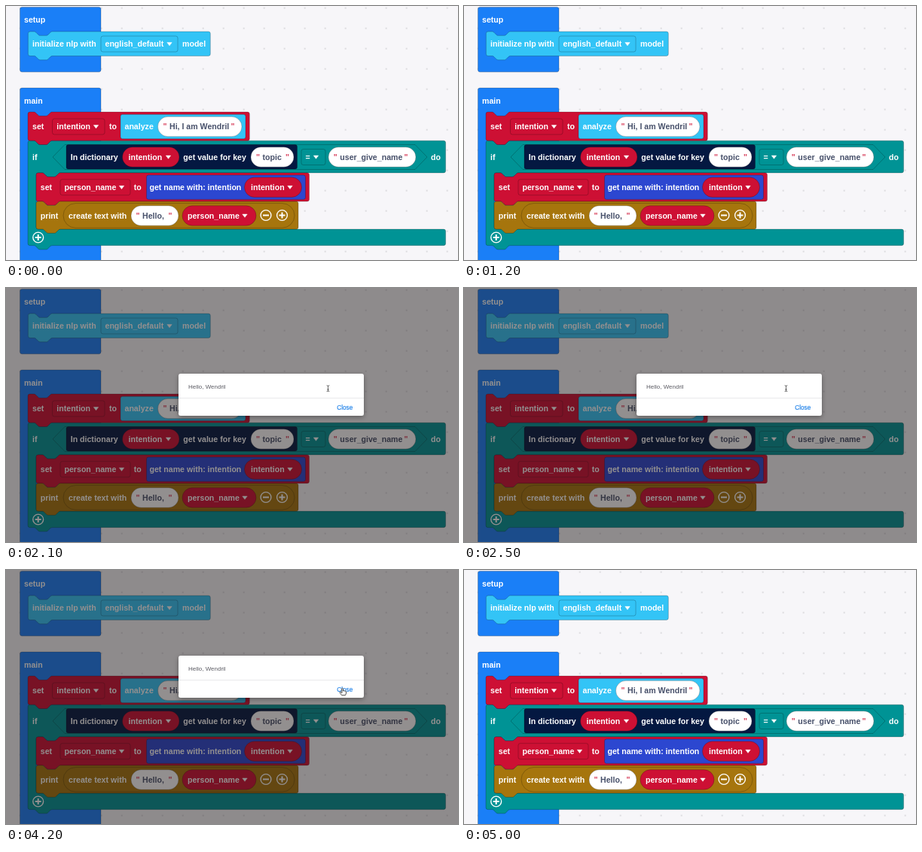
These frames come from a looping animation (600 px wide and 338 px high, 5100 ms). An HTML page:

```html
<!DOCTYPE html>
<html lang="en">
<head>
<meta charset="utf-8">
<title>Block program greeting</title>
<style>
html, body { margin: 0; width: 100%; height: 100%; overflow: hidden; background: #f7f6f9; }
svg { display: block; width: 600px; height: 338px; }
text { font: bold 10.6px "Liberation Sans", Arial, sans-serif; white-space: pre; }
.edge { stroke: #000; stroke-opacity: .28; stroke-width: .8; }
#dialog text { font-size: 8px; font-weight: normal; }
</style>
</head>
<body>
<svg viewBox="0 0 600 338">
  <defs>
    <pattern id="dots" x="17.6" y="1.6" width="27" height="27" patternUnits="userSpaceOnUse">
      <rect x=".4" y=".4" width="1.5" height="1.5" fill="#c8c7cb"/>
    </pattern>
    <filter id="shadow" x="-10%" y="-30%" width="120%" height="170%">
      <feDropShadow dx="0" dy="2" stdDeviation="3" flood-opacity=".35"/>
    </filter>
  </defs>
  <rect width="600" height="338" fill="#f7f6f9"/>
  <rect width="600" height="338" fill="url(#dots)"/>
  <g id="blocks"></g>
  <rect id="dim" width="600" height="338" fill="#1c1616" opacity="0"/>
  <g id="dialog" opacity="0">
    <rect x="229" y="114" width="246" height="56" rx="3" fill="#fff" filter="url(#shadow)"/>
    <path d="M229 146.5H475" stroke="#e4e4e6" stroke-width=".8"/>
    <text x="242" y="134.3" fill="#5c5c64">Hello, Wendril</text>
    <text x="439.3" y="161.5" fill="#1a7fe8" style="font-size:8.2px" stroke="#1a7fe8" stroke-width=".15">Close</text>
  </g>
  <g id="cursor" display="none" stroke-linejoin="round" stroke-linecap="round">
    <path id="beam" d="M-1.4-4Q0-4 0-3Q0-4 1.4-4M0-3V3M-1.4 4Q0 4 0 3Q0 4 1.4 4M-.9 1.3H.9" fill="none" stroke="#333" stroke-width=".7"/>
    <path id="arrow" d="M0 0V7.4L1.7 5.8L2.9 8.5L4.2 7.9L3 5.3H5.2Z" fill="#111" stroke="#fff" stroke-width=".6"/>
    <path id="hand" d="M-.8.8Q0-.6.8.8V4L2 3.6L3.2 4L4.3 4.2L5 5V7.2L4 9.6H-.9L-3.4 6.2Q-3.6 4.8-2.3 5.2L-.8 6.4Z" fill="#fff" stroke="#222" stroke-width=".8"/>
  </g>
</svg>
<script>
const LOOP = 5100, STEP = 100;
const $ = id => document.getElementById(id);
const BLUE = '#1a7ff7', CYAN = '#33c4f6', RED = '#cd1034', TEAL = '#009395',
      GOLD = '#a6750d', NAVY = '#041841', INDIGO = '#2c47d0', INK = '#47506a';

// Connector bump, 24.2 px wide, drawn rightwards or leftwards
const bump = s => `c${1.3 * s} 0 ${2 * s} .7 ${2.7 * s} 1.3l${2.7 * s} 2.7c${.7 * s} .7 ${1.3 * s} 1.3 ${2.7 * s} 1.3` +
  `h${8 * s}c${1.3 * s} 0 ${2 * s} -.7 ${2.7 * s} -1.3l${2.7 * s} -2.7c${.7 * s} -.7 ${1.3 * s} -1.3 ${2.7 * s} -1.3`;
const NOTCH = bump(1), TAB = bump(-1);

const path = (d, fill) => `<path class="edge" d="${d}" fill="${fill}"/>`;
const box = (x, y, w, h, fill, r = 2.7) =>
  `<rect class="edge" x="${x}" y="${y}" width="${w}" height="${h}" rx="${r}" fill="${fill}"/>`;
const label = (x, y, s, fill = '#fff') => `<text x="${x}" y="${y}" fill="${fill}">${s}</text>`;
const caret = (x, y) => `<path d="M${x - 3.2} ${y - 1.9}h6.4l-3.2 4.2z" fill="#fff" stroke="#fff" stroke-width=".5" stroke-linejoin="round"/>`;

function stack(x, y, w, h, fill) {
  const b = y + h, r = x + w;
  return path(`M${x} ${y + 2.7}q0-2.7 2.7-2.7H${x + 8}${NOTCH}H${r - 2.7}q2.7 0 2.7 2.7V${b - 2.7}q0 2.7-2.7 2.7` +
    `H${x + 32.2}${TAB}H${x + 2.7}q-2.7 0-2.7-2.7Z`, fill);
}

function field(x, mid, w, fill, s, textX, caretX, h = 21, r = 2.7) {
  return box(x, mid - h / 2, w, h, fill, r) + label(textX, mid + 3.8, s) + caret(caretX, mid);
}

const variable = (x, mid, w, s, textX, caretX) => field(x, mid, w, RED, s, textX, caretX, 26.4, 13.2);

function literal(x, mid, w, s, textX, openX, closeX) {
  const quote = qx => label(qx, mid + 3.8, '&quot;', '#d8435e');
  return box(x, mid - 13.2, w, 26.4, '#fff', 13.2) + quote(openX) + label(textX, mid + 3.8, s, INK) + quote(closeX);
}

function button(x, y, plus, r = 6.9) {
  return `<circle cx="${x}" cy="${y}" r="${r}" fill="none" stroke="#fff" stroke-width="1.4"/>` +
    `<path d="M${x - 4} ${y}h8${plus ? `M${x} ${y - 4}v8` : ''}" stroke="#fff" stroke-width="2"/>`;
}

const loopBlock = `M29 181.9q0-2.7 2.7-2.7H37${NOTCH}H580.9q2.7 0 2.7 2.7V219.3q0 2.7-2.7 2.7H72.2${TAB}H42.7` +
  `q-2.7 0-2.7 2.7V294.3q0 2.7 2.7 2.7H580.9q2.7 0 2.7 2.7V316q0 2.7-2.7 2.7H61.2${TAB}H31.7q-2.7 0-2.7-2.7Z`;

$('blocks').innerHTML = [
  box(18.5, 1.5, 107.5, 86.3, BLUE), label(24, 22.2, 'setup'),
  stack(29.3, 34, 242, 32.5, CYAN), label(35, 54.3, 'initialize nlp with'),
  field(126, 50.5, 102, CYAN, 'english_default', 131.5, 217), label(234, 54.3, 'model'),

  box(18.5, 109, 107.5, 250, BLUE), label(24, 129.6, 'main'),
  path(loopBlock, TEAL),
  stack(29, 141, 294.3, 38.2, RED), label(35, 164.3, 'set'),
  field(61.5, 160.5, 69.5, RED, 'intention', 67.3, 119.5), label(137, 164.3, 'to'),
  box(152, 144.3, 166, 32.4, CYAN), label(157.5, 164.3, 'analyze'),
  literal(201.5, 160.5, 111.5, 'Hi, I am Wendril', 217, 208.5, 298.5),

  label(35, 204.8, 'if'),
  path('M62 201L78 184.5H543L559 201L543 217.5H78Z', TEAL),
  box(80, 184.5, 306.5, 32.5, NAVY), label(85.7, 204.8, 'In dictionary'),
  variable(154.5, 201, 75.5, 'intention', 162.5, 215.5),
  label(235.3, 204.8, 'get value for key'),
  literal(325, 201, 57, 'topic', 340.5, 332, 371),
  field(392, 201, 32, TEAL, '=', 397.5, 411.5),
  literal(428, 201, 116, 'user_give_name', 443.3, 434.8, 528.5),
  label(564, 204.8, 'do'),

  stack(40, 222, 362.5, 38, RED), label(45.8, 245, 'set'),
  field(72, 241.2, 93, RED, 'person_name', 77.5, 153.5), label(169.8, 245, 'to'),
  box(186.5, 225, 211, 32.4, INDIGO), label(190.5, 245, 'get name with: intention'),
  variable(316.5, 241.2, 76, 'intention', 325, 377),

  stack(40, 260, 348, 37, GOLD), label(45.8, 282.8, 'print'),
  box(76, 262.6, 307, 32.6, GOLD, 16.3), label(83, 282.8, 'create text with'),
  literal(166, 279, 63, 'Hello,', 181, 172.5, 215.5),
  variable(234, 279, 98, 'person_name', 241, 317),
  button(345, 278.5, false), button(366.5, 278.5, true),
  button(42.7, 308, true)
].join('');

const clamp = v => Math.min(1, Math.max(0, v));
const ramp = (t, a, b) => clamp((t - a) / (b - a));
const ease = v => v * v * (3 - 2 * v);

function draw(now) {
  const t = Math.floor(now % LOOP / STEP) * STEP;
  const shown = ramp(t, 1700, 2100) - ramp(t, 4350, 4750);
  $('dim').setAttribute('opacity', .48 * shown);
  $('dialog').setAttribute('opacity', shown);

  const drift = ease(ramp(t, 2600, 3400)), reach = ease(ramp(t, 3500, 4200));
  const x = 427.5 + 4.5 * drift + 14.5 * reach;
  const y = 133.7 + 3.3 * drift + 20 * reach;
  const shape = y > 152 ? 'hand' : y > 135.5 ? 'arrow' : 'beam';
  $('cursor').setAttribute('transform', `translate(${x} ${y})`);
  $('cursor').setAttribute('display', t >= 2000 && t < 4800 ? 'inline' : 'none');
  for (const id of ['beam', 'arrow', 'hand']) $(id).setAttribute('display', id === shape ? 'inline' : 'none');
  requestAnimationFrame(() => draw(performance.now() - start));
}
const start = performance.now();
draw(0);
</script>
</body>
</html>
```
